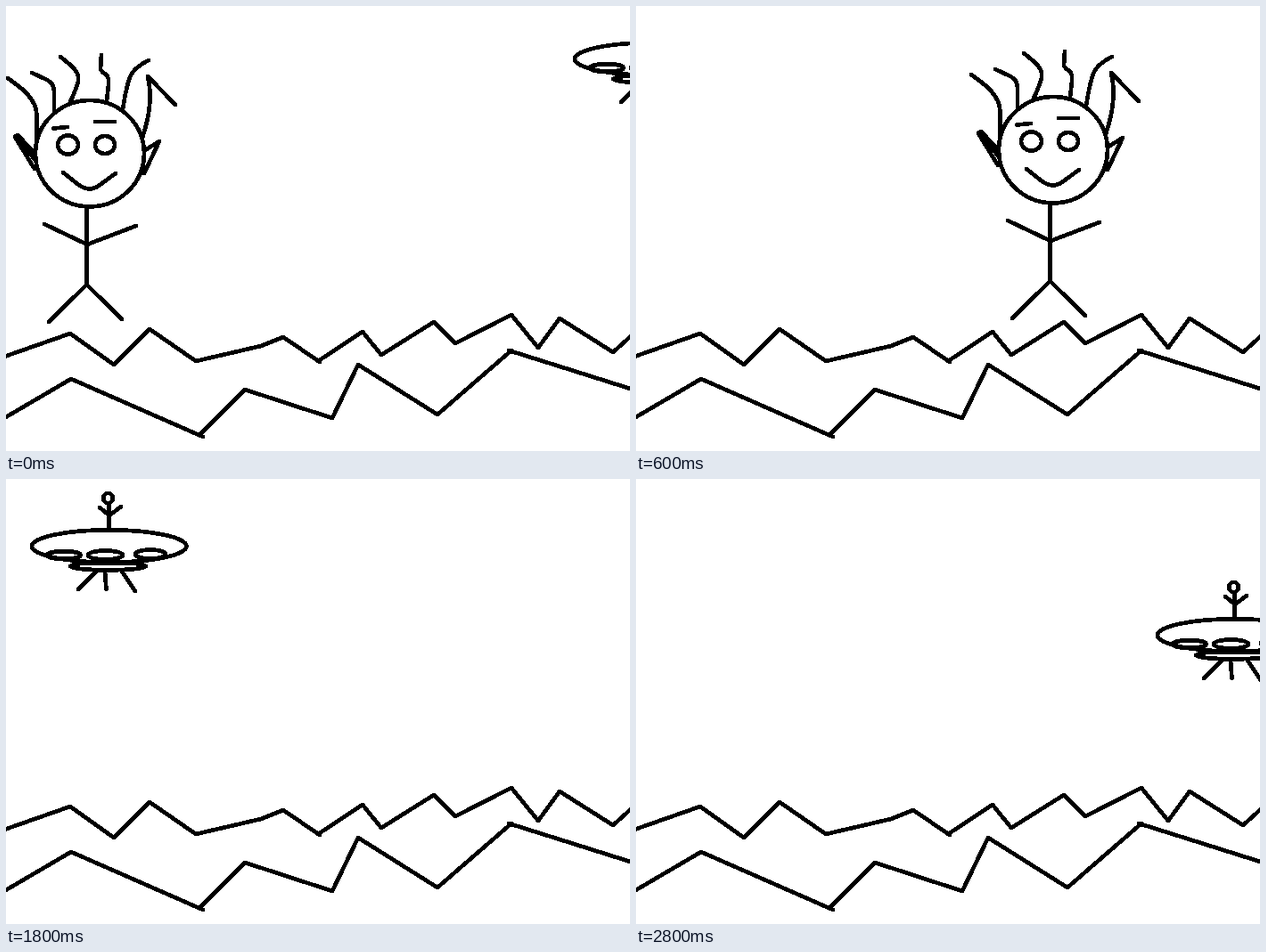
Write an HTML page that moves like this. It is 700x500 px and loops after 3 s.

```html
<!DOCTYPE html>
<html lang="en">
<head>
<meta charset="utf-8">
<title>Saucer visit</title>
<style>
html, body { margin: 0; width: 100%; height: 100%; overflow: hidden; background: #fff; }
svg { display: block; width: 700px; height: 500px; }
svg * { fill: none; stroke: #000; stroke-width: 4.7; stroke-linecap: round; stroke-linejoin: round; shape-rendering: crispEdges; }
</style>
</head>
<body>
<svg viewBox="0 0 700 500">
  <path d="M-2 394L72 368 121 403 161 363 213 399 286 382 311 372 352 400M350 399L400 366 421 392 480 355 504 379 567 347 597 384 621 351 681 389 702 370"/>
  <path d="M-2 463L73 419 221 484M217 482L268 431 366 463 395 403 484 459 567 387M564 387L702 430.5"/>

  <g id="man">
    <ellipse cx="468" cy="161.7" rx="61" ry="59.7"/>
    <path d="M376 77L388 86Q406 100 408 114Q409 122 408 150"/>
    <path d="M403 71L420 79Q428 83 428 92V114"/>
    <path d="M435 53L446 62Q457 72 455 80Q454 87 445 106"/>
    <path d="M481 51L480 66Q480 69 486 73Q490 76 489 85L487 102"/>
    <path d="M534 57Q520 64 515 72Q510 80 505 112"/>
    <path d="M564 107L533 75Q537 92 535 108Q534 122 527 144"/>
    <path d="M407 162L387 141 384 143 406 179M387 143L408 171M530 158L546 148 529 184"/>
    <path d="M438 183L453 195Q466 206 478 198L497 184"/>
    <path d="M464.5 222V309M417 241L465 264 520 243M422 351L464.5 309 504 348"/>
    <g id="calm">
      <path d="M427 133.5L443 132M474 126H496"/>
      <ellipse cx="443.5" cy="152" rx="11.5" ry="10.5"/>
      <ellipse cx="485" cy="152" rx="11" ry="10"/>
    </g>
    <g id="puzzled">
      <path d="M436 132L459 143M491 141L508 154"/>
      <ellipse cx="443" cy="153" rx="12" ry="5.5"/>
      <ellipse cx="487" cy="161" rx="9" ry="4.5"/>
    </g>
  </g>

  <path id="leftMark" d="M313 135L351 125 330 182 335 212M338 227L341 234"/>
  <path id="rightMark" d="M313 135L351 125 330 182 335 212M338 227L341 234"/>

  <g id="saucer">
    <ellipse cx="114.5" cy="21.5" rx="5.3" ry="5.6"/>
    <path d="M115.5 27V56M105 32L116 41 129 31"/>
    <ellipse cx="115.7" cy="75.5" rx="86.7" ry="18.2"/>
    <ellipse cx="65" cy="85.5" rx="18.7" ry="4.3"/>
    <ellipse cx="111.5" cy="85.5" rx="19.5" ry="5"/>
    <ellipse cx="162" cy="84.5" rx="17" ry="5"/>
    <ellipse cx="114.5" cy="98" rx="42.5" ry="4.3"/>
    <path d="M76 95H153M101 104L81 124M111 104L112.5 124M130 104L145 126"/>
  </g>
</svg>
<script>
const STEP = 200;
const STEPS = 15;
const part = id => document.getElementById(id);

// Offsets keyed by step; parts without an entry are hidden.
const manAt = { 0: [-374, 4], 1: [-300, 8], 2: [-157, 12], 8: [180, -13] };
for (let i = 3; i < 8; i++) manAt[i] = [0, 0];

const saucerAt = {
  0: [609, -16], 9: [0, 0], 10: [139, 70], 11: [236, 126],
  12: [329, 49], 13: [466, 144], 14: [556, 100]
};
const leftMarkAt = { 5: [0, 0], 6: [0, 0], 7: [0, 0] };
const rightMarkAt = { 4: [282, -4], 7: [261, 2] };

function show(id, visible) {
  part(id).style.display = visible ? "" : "none";
}

function place(id, offset) {
  show(id, offset);
  if (offset) part(id).setAttribute("transform", `translate(${offset})`);
}

function draw(now) {
  const step = Math.floor(now / STEP) % STEPS;
  place("man", manAt[step]);
  place("saucer", saucerAt[step]);
  place("leftMark", leftMarkAt[step]);
  place("rightMark", rightMarkAt[step]);
  show("calm", step < 4);
  show("puzzled", step >= 4);
  requestAnimationFrame(draw);
}
draw(0);
</script>
</body>
</html>
```
